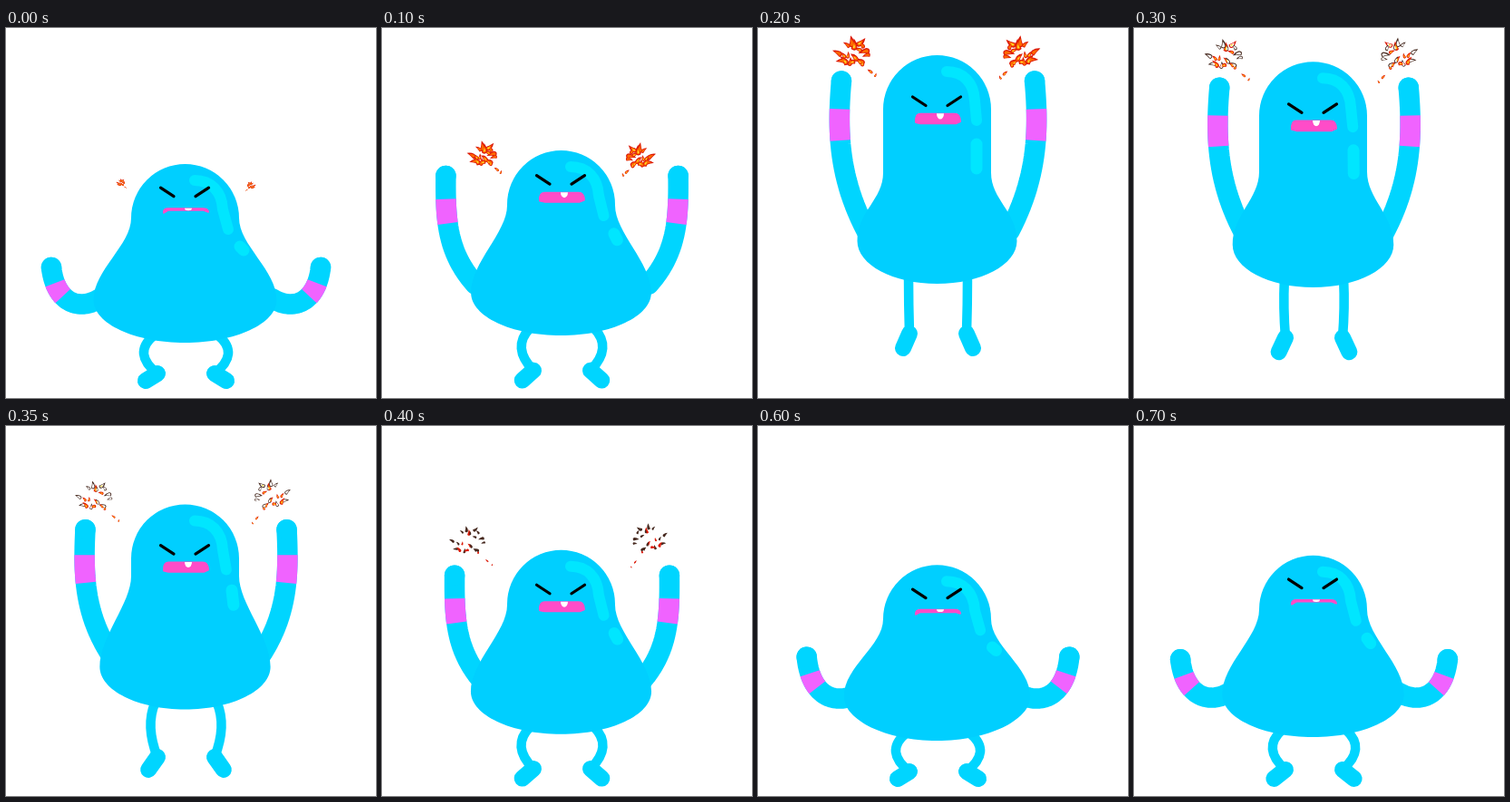
These frames come from a looping animation (408 px wide and 408 px high, 0.75 s). An HTML page with a canvas:

```html
<!DOCTYPE html>
<html lang="en">
<head>
<meta charset="utf-8">
<title>Angry blob</title>
<style>
html, body { margin: 0; width: 100%; height: 100%; overflow: hidden; background: #fff; }
canvas { display: block; width: 408px; height: 408px; }
</style>
</head>
<body>
<canvas id="stage" width="408" height="408"></canvas>
<script>
const ctx = document.getElementById('stage').getContext('2d');
const LOOP = 750, STEP = 50, AXIS = 197.5, MIRROR = 397;
const BLUE = '#00cfff', LIMB = '#00d5ff', SHINE = '#00e6ff';
const BAND = '#f063ff', LIPS = '#ff4cc8';

// Two curves of [time, value] drive everything: the jump and the raised arms.
const JUMP = [[0, 0], [100, .125], [200, 1], [300, .94], [400, .11], [500, -.1], [700, .06]];
const RAISE = [[0, 0], [100, 1], [400, 1], [500, .27], [700, 0]];

// Hand-to-shoulder bezier: hanging, raised, and raised in mid jump.
const ARM = {
  low: [50, 264, 54, 300, 78, 314, 104, 298],
  up: [73, 177, 73, 226, 75, 259, 106, 291],
  high: [92, 65, 87, 123, 92, 171, 121, 224]
};

const lerp = (a, b, u) => a + (b - a) * u;

// Soft cardinal spline, wrapping round the loop.
function curve(keys, time) {
  const t = (time + LOOP) % LOOP, n = keys.length;
  const key = k => {
    const [kt, kv] = keys[(k + n) % n];
    return [kt + LOOP * Math.floor(k / n), kv];
  };
  let i = n - 1;
  while (keys[i][0] > t) i--;
  const [[t0, v0], [t1, v1], [t2, v2], [t3, v3]] = [-1, 0, 1, 2].map(k => key(i + k));
  const span = t2 - t1, u = (t - t1) / span, w = 1 - u;
  const m1 = .5 * span * (v2 - v0) / (t2 - t0), m2 = .5 * span * (v3 - v1) / (t3 - t1);
  return lerp(v1, v2, u * u * (3 - 2 * u)) + u * w * (m1 * w - m2 * u);
}

function fill(color) {
  ctx.fillStyle = color;
  ctx.fill();
}

function stroke(color, width, cap = 'round') {
  ctx.strokeStyle = color;
  ctx.lineWidth = width;
  ctx.lineCap = cap;
  ctx.lineJoin = 'round';
  ctx.stroke();
}

function line(points, color, width, cap) {
  ctx.beginPath();
  points.forEach(([x, y]) => ctx.lineTo(x, y));
  stroke(color, width, cap);
}

function mirrored(x, draw) {
  ctx.save();
  ctx.translate(x, 0);
  ctx.scale(-1, 1);
  draw();
  ctx.restore();
}

function bezier(p, t) {
  const s = 1 - t;
  return [0, 1].map(k => s * s * s * p[k] + 3 * s * s * t * p[k + 2] +
    3 * s * t * t * p[k + 4] + t * t * t * p[k + 6]);
}

function arm(jump, raise, drift) {
  const p = ARM.low.map((low, i) =>
    lerp(low, ARM.up[i], raise) + (ARM.high[i] - ARM.up[i]) * jump + (i % 2 ? 0 : drift));
  const part = (a, b) => Array.from({ length: 25 }, (_, i) => bezier(p, lerp(a, b, i / 24)));
  line(part(0, 1), LIMB, 22.5);
  line([p.slice(0, 2)], LIMB, 22.5);
  line(part(.18, .39), BAND, 22.5, 'butt');
}

function leg(jump, bottom) {
  const toeY = 389 - 36 * jump * jump;
  const heelY = toeY - 8 - 8 * Math.sqrt(jump);
  ctx.beginPath();
  ctx.moveTo(lerp(163, 166, jump), bottom - 8);
  ctx.quadraticCurveTo(lerp(139, 166, jump), lerp(359, 305, jump), 167, heelY);
  stroke(LIMB, 10.5);
  line([[167, heelY], [lerp(154, 160, jump), toeY]], LIMB, 18);
}

function body(top, bottom, jump) {
  const r = 59.5, squash = Math.max(0, -jump);
  const neck = top + r + 70 * jump * jump;
  const side = 300 - 65 * Math.abs(jump);
  const half = 101 - 13 * jump + 50 * squash;
  const flank = () => {
    ctx.moveTo(AXIS, top);
    ctx.arc(AXIS, top + r, r, -Math.PI / 2, 0);
    ctx.lineTo(AXIS + r, neck);
    ctx.bezierCurveTo(AXIS + r, neck + 30, AXIS + half, side - 33, AXIS + half, side);
    ctx.bezierCurveTo(AXIS + half, side + 26, AXIS + half * .55, bottom, AXIS, bottom);
  };
  ctx.beginPath();
  flank();
  mirrored(2 * AXIS, flank);
  fill(BLUE);
}

function shine(top, jump) {
  ctx.beginPath();
  ctx.moveTo(208, top + 18);
  ctx.bezierCurveTo(226, top + 18, 238, top + 30, 239, top + 50);
  ctx.lineTo(245 - 4 * jump, top + 72);
  stroke(SHINE, 12);
  line([[258 - 17 * jump, top + 91 + 7 * jump], [262 - 21 * jump, top + 95 + 30 * jump]], SHINE, 13);
}

function face(eye, open) {
  const brow = () => line([[170.5, eye], [185, eye + 9.5]], '#000', 3.2);
  brow();
  mirrored(394, brow);

  const y = eye + 22 - 4 * open, b = y + 6.5 + 4.5 * open, notch = 4 * (1 - open);
  ctx.beginPath();
  ctx.moveTo(174, b - 1);
  ctx.quadraticCurveTo(173.5, y + 1, 179, y + 1);
  ctx.lineTo(217, y + 1);
  ctx.quadraticCurveTo(222.5, y + 1, 223, b - 2);
  ctx.lineTo(218, b - notch);
  ctx.lineTo(179, b - notch);
  ctx.closePath();
  fill(LIPS);
  stroke(LIPS, 2);
  ctx.beginPath();
  ctx.ellipse(201, y + .5, 4, 2.5 + 3.5 * open, 0, 0, Math.PI);
  fill('#fff');
}

function random(seed) {
  return () => (seed = seed * 16807 % 2147483647) / 2147483647;
}

// Bits of fire: a cloud up and out, with a thin trail to the inner end.
const rnd = random(4711);
const bits = Array.from({ length: 24 }, (_, i) => {
  const trail = i % 4 === 0, a = i * 2.4, d = .3 + .7 * rnd(), u = rnd();
  return {
    x: trail ? -26 * u : -28 + 18 * d * Math.cos(a),
    y: trail ? -23 * u : -28 + 14 * d * Math.sin(a),
    r: trail ? 2 + 3 * u : 3.5 + 3 * rnd(),
    turn: -2.4 + (rnd() - .5) * 3,
    tone: rnd()
  };
});

function tongue(b, size, color) {
  const r = b.r * size;
  ctx.save();
  ctx.translate(b.x, b.y);
  ctx.rotate(b.turn);
  ctx.beginPath();
  ctx.moveTo(r * 1.7, r * .5);
  ctx.quadraticCurveTo(r * .5, -r * .1, -r * .2, -r * .7);
  ctx.quadraticCurveTo(-r * 1.2, 0, -r * .3, r * .6);
  ctx.quadraticCurveTo(r * .7, r * .9, r * 1.7, r * .5);
  fill(color);
  ctx.restore();
}

// Burns bright, then chars to hollow flakes, then to specks and a smoke ring.
function fire(age) {
  const spread = 1.05 - .83 * Math.max(0, 1 - age) ** 4.4;
  const size = Math.min(1, 1.3 - 1.1 * age), char = age < .6 ? 0 : age - .1;
  ctx.scale(spread, spread);
  bits.forEach(b => tongue(b, size, b.tone < char ? '#46291f' : '#dc1a08'));
  if (age < .8) {
    bits.forEach(b => tongue(b, size * .62, char && b.tone < .6 ? '#fff' : '#ff6a00'));
    bits.forEach(b => { if (b.tone > .5) tongue(b, size * .32, '#ffe02a'); });
  }
  if (age >= 1) {
    ctx.beginPath();
    ctx.arc(-7.5, -8.5, 3.6, 0, 7);
    stroke('#4a4620', 1.5);
  }
}

function sparks(t, top) {
  const age = t / 500;
  if (age >= 1.2) return;
  const x = 133 - 17 * age ** 3, y = top + 27 - 12 * age * age;
  ctx.save();
  ctx.translate(x, y);
  fire(age);
  ctx.restore();
  mirrored(MIRROR - x, () => {
    ctx.translate(0, y + 3);
    ctx.rotate(.28 * age);
    fire(age);
  });
}

function draw(t) {
  const jump = curve(JUMP, t), raise = curve(RAISE, t);
  const air = Math.max(0, jump), squash = air - jump;
  const top = 150 - 120 * jump, bottom = 347 - 65 * air;
  const sag = Math.max(air, curve(JUMP, t - 60));
  const drift = raise * (t - 250) / 30;

  ctx.fillStyle = '#fff';
  ctx.fillRect(0, 0, 408, 408);
  const limbs = () => {
    leg(air, bottom);
    arm(air, raise, drift);
  };
  limbs();
  mirrored(MIRROR, limbs);
  body(top, bottom, jump);
  shine(top, jump);
  face(top + 25 + 21 * sag + 70 * squash, raise);
  sparks(t, top);
}

const start = performance.now();
function tick() {
  const t = (performance.now() - start) % LOOP;
  draw(Math.floor(t / STEP) * STEP);
  requestAnimationFrame(tick);
}
tick();
</script>
</body>
</html>
```
